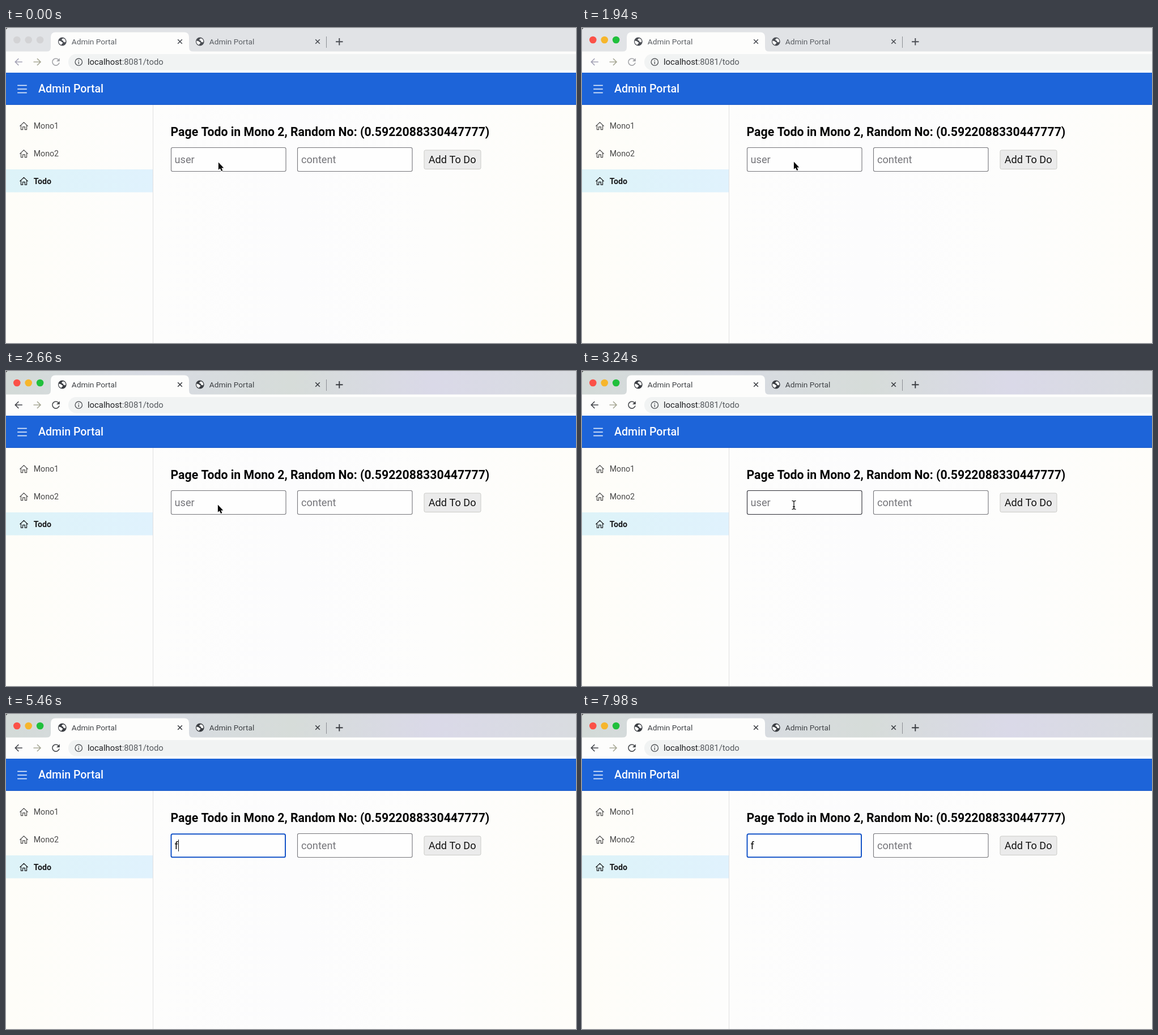
An HTML page with a canvas that plays this animation: 1006x557 px, repeating every 8 s.

```html
<!DOCTYPE html>
<html lang="en">
<head>
<meta charset="utf-8">
<title>Admin Portal</title>
<style>
html, body { margin: 0; width: 100%; height: 100%; overflow: hidden; background: #fdfdfb; }
canvas { display: block; width: 1006px; height: 557px; }
</style>
</head>
<body>
<canvas id="stage"></canvas>
<script>
const W = 1006, H = 557, LOOP = 8000;
const canvas = document.getElementById('stage');
const ctx = canvas.getContext('2d');
const ratio = window.devicePixelRatio || 1;
canvas.width = Math.round(W * ratio);
canvas.height = Math.round(H * ratio);

const LIGHTS_ON = 1920, ACTIVE = 1960, HOVER = 2860, FOCUS = 3500;
// Each entry: time, text in the field, caret shown
const EDITS = [
  [FOCUS, '', true], [4000, '', false], [4500, '', true], [5000, '', false],
  [5460, 'f', true], [5960, 'fo', true], [6480, 'fod', true], [7000, 'fod', false],
  [7300, 'fo', true], [7580, 'f', true], [7970, 'f', false]
];

const font = (size, weight = 400) => `${weight} ${size}px Roboto, Arial, sans-serif`;

function text(str, x, y, size, color, weight) {
  ctx.font = font(size, weight);
  ctx.fillStyle = color;
  ctx.fillText(str, x, y);
}

function rect(x, y, w, h, color) {
  ctx.fillStyle = color;
  ctx.fillRect(x, y, w, h);
}

function box(x, y, w, h, r, fill, stroke, width = 1) {
  ctx.beginPath();
  ctx.roundRect(x, y, w, h, r);
  if (fill) { ctx.fillStyle = fill; ctx.fill(); }
  if (stroke) { ctx.strokeStyle = stroke; ctx.lineWidth = width; ctx.stroke(); }
}

function disc(x, y, r, color) {
  ctx.beginPath();
  ctx.arc(x, y, r, 0, Math.PI * 2);
  ctx.fillStyle = color;
  ctx.fill();
}

function stroke(path, color, width) {
  ctx.strokeStyle = color;
  ctx.lineWidth = width;
  ctx.stroke(new Path2D(path));
}

function at(x, y, draw) {
  ctx.save();
  ctx.translate(x, y);
  draw();
  ctx.restore();
}

function ramp(x0, x1, ...colors) {
  const g = ctx.createLinearGradient(x0, 0, x1, 0);
  colors.forEach((c, i) => g.addColorStop(i / (colors.length - 1), c));
  return g;
}

function globe(x, y, color) {
  at(x, y, () => {
    disc(0, 0, 7.4, color);
    ctx.fillStyle = '#fafafa';
    ctx.fill(new Path2D('M-6 -1.5L-2.5 -.8L-.5 1L1 1.8L.5 3.6L-1 4.2L-1.3 6.1A6 6 0 0 1 -6 -1.5Z'));
    ctx.fill(new Path2D('M1.5 -5.8L-1 -4L-.8 -2.4L1.4 -1.4L2.6 1L5 1.3L6 .2A6 6 0 0 0 1.5 -5.8Z'));
  });
}

function tab(x, label, color, iconColor) {
  globe(x, 24, iconColor);
  text(label, x + 16.5, 28.7, 13.7, color);
  at(x + 207.7, 24, () => stroke('M-3.8 -3.8L3.8 3.8M3.8 -3.8L-3.8 3.8', iconColor, 1.6));
}

function browserBar(t) {
  const active = t >= ACTIVE;
  const ink = active ? '#3f4246' : '#5c6065';
  const icon = active ? '#3a3d42' : '#4b4e54';

  rect(0, 0, W, 42, active ? ramp(0, W, '#d3dad7', '#d8dbe3', '#d6dcd9', '#dad9e8', '#d9dce0') : '#e1e3e6');
  const lights = t >= LIGHTS_ON ? ['#fb5148', '#f6b62c', '#20c03c'] : ['#d3d3d5', '#d3d3d5', '#d3d3d5'];
  lights.forEach((c, i) => disc(19.3 + i * 20.4, 21, 6.3, c));

  ctx.fillStyle = '#fdfdfc';
  ctx.fill(new Path2D('M71 42Q79 42 79 34V16Q79 7.5 87.5 7.5H314.5Q323 7.5 323 16V34Q323 42 331 42Z'));
  tab(99.3, 'Admin Portal', ink, icon);
  tab(342.3, 'Admin Portal', ink, icon);
  rect(565, 15, 1, 20, '#8c8f94');
  at(588.3, 24.3, () => stroke('M-6.2 0H6.2M0 -6.2V6.2', icon, 1.9));

  rect(0, 41.5, W, 37.5, '#fdfdfc');
  at(22.3, 60, () => stroke('M6.5 0H-5.8M0 -6L-6 0L0 6', active ? '#414348' : '#a2a1b4', 1.6));
  at(55, 60, () => stroke('M-6.5 0H5.8M0 -6L6 0L0 6', '#a7a895', 1.6));
  at(88, 60, () => {
    const c = active ? '#46484c' : '#a3a4a8';
    stroke('M5.2 -3.2A6.1 6.1 0 1 0 6 1.3', c, 1.6);
    ctx.fillStyle = c;
    ctx.fill(new Path2D('M6.8 -6.8V-1H1Z'));
  });

  box(110, 46, W, 28.5, 14, '#f1f3f3');
  at(128.3, 60.2, () => {
    stroke('M6.2 0A6.2 6.2 0 1 1 -6.2 0A6.2 6.2 0 1 1 6.2 0M0 -.8V3.5M0 -3.4V-1.9', '#55585c', 1.4);
  });
  text('localhost', 144, 65.2, 14.85, '#202124');
  const hostWidth = ctx.measureText('localhost').width;
  text(':8081/todo', 144 + hostWidth, 65.2, 14.85, '#55595e');

  ctx.fillStyle = '#3b3b3b';
  ctx.fill(new Path2D('M0 0H3Q.6 .6 0 3Z'));
}

function menuItem(label, y, selected) {
  const color = selected ? '#18191b' : '#4a4a4a';
  if (selected) rect(0, y - 20.5, 259, 40.5, ramp(0, 259, '#ddf3f8', '#e0f2fd'));
  at(31.5, y, () => stroke(
    'M-7.2 .6L0 -6.2L7.2 .6M-5 -1V6.7H-1.9V1.9H1.9V6.7H5V-1', color, 1.2));
  text(label, 48.7, y + 5, 14.2, color, selected ? 700 : 400);
}

function field(x, state) {
  if (state === 'focus') box(291.5, 212.2, 201.5, 41, 2.5, '#fefefe', '#1554c8', 2);
  else box(x + 0.5, 211.5, 202.5, 42, 2.5, '#fefefe', state === 'hover' ? '#2c2c34' : '#75757a', 1.1);
}

function page(t) {
  rect(0, 79, W, H - 79, ramp(0, W, '#fefdf8', '#fdfdfc', '#fcfcfd', '#fdfdfc', '#fefdf9'));
  rect(0, 78, W, 1, '#e8d9c4');
  rect(0, 79, W, 57, '#1d64d9');
  rect(0, 135, W, 1, '#1b5ac6');
  at(28.5, 108, () => stroke('M-8.3 -6.5H8.3M0 0M-8.3 0H8.3M-8.3 6.5H8.3', '#f4f8ff', 1.5));
  text('Admin Portal', 57, 114, 19.6, '#fbfcff', 500);

  menuItem('Mono1', 173, false);
  menuItem('Mono2', 222, false);
  menuItem('Todo', 270.5, true);
  rect(259, 136, 1, H - 136, '#e0e0e0');

  text('Page Todo in Mono 2, Random No: (0.5922088330447777)', 290.5, 191, 21.25, '#050505', 700);

  const [, value, caret] = EDITS.filter(e => e[0] <= t).pop() || [0, '', false];
  field(291, t >= FOCUS ? 'focus' : t >= HOVER ? 'hover' : '');
  if (value) text(value, 297.5, 239, 18.16, '#0a0a0a');
  else text('user', 297.5, 239, 18.16, '#75757a');
  if (caret) {
    ctx.font = font(18.16);
    rect(Math.round(297.5 + ctx.measureText(value).width), 222, 1, 21, '#111');
  }

  field(514);
  text('content', 521, 239, 18.16, '#75757a');
  box(738, 216, 100, 33.5, 2.5, '#ebebeb', '#cbcbc8');
  text('Add To Do', 745.7, 239, 18.16, '#111');
}

function pointer(t) {
  if (t < HOVER) {
    const k = Math.min(1, Math.max(0, (t - 900) / 600));
    at(374.9 - k, 237.6 - k, () => {
      const arrow = new Path2D('M0 0V13.2L3 10.6L5.2 15.4L7.5 14.4L5.4 9.8H9.4Z');
      ctx.lineJoin = 'round';
      ctx.strokeStyle = '#fff';
      ctx.lineWidth = 2;
      ctx.stroke(arrow);
      ctx.fillStyle = '#080808';
      ctx.fill(arrow);
    });
  } else if (t < EDITS[4][0]) {
    at(374, 237, () => {
      const beam = 'M-3.5 -7.6Q0 -7.6 0 -5V5Q0 7.6 -3.5 7.6M3.5 -7.6Q0 -7.6 0 -5V5Q0 7.6 3.5 7.6M-2 3H2';
      stroke(beam, '#fff', 3);
      stroke(beam, '#151515', 1.3);
    });
  }
}

function draw(now) {
  const t = now % LOOP;
  ctx.setTransform(ratio, 0, 0, ratio, 0, 0);
  page(t);
  browserBar(t);
  pointer(t);
}

const start = performance.now();
function frame() {
  draw(performance.now() - start);
  requestAnimationFrame(frame);
}
frame();
</script>
</body>
</html>
```
